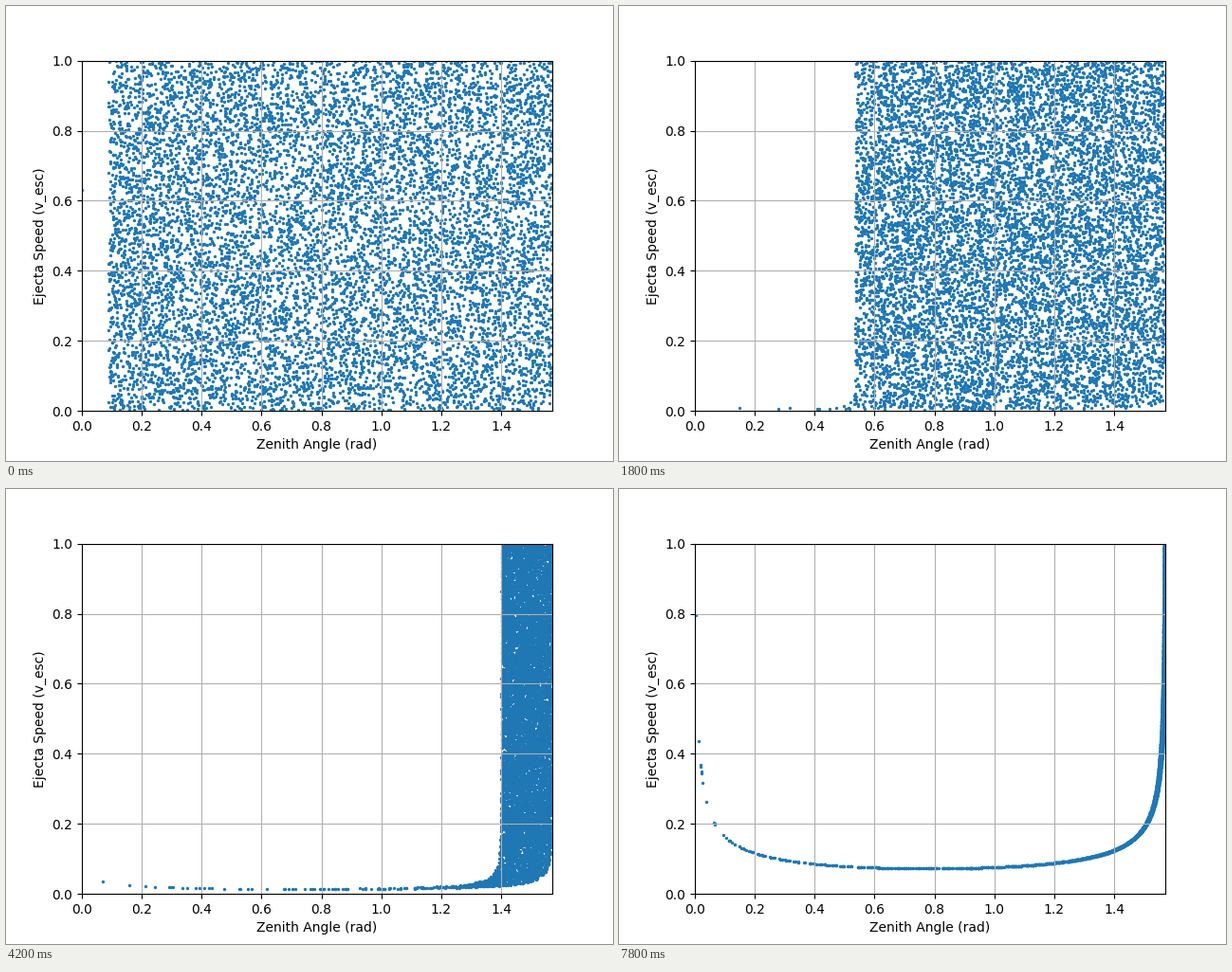
A matplotlib script that plays this animation: 640 by 480 pixels, repeating every 8 s.

```python
import numpy as np
import matplotlib.pyplot as plt
from matplotlib.animation import FuncAnimation

STEPS, HOLD, TICK_MS, LOOP_MS = 27, 3, 100, 8000
POINTS, BATCH = 10000, 400_000
# Lengths are in units of the body's diameter, speeds in escape speeds.
HEIGHT = 3.09e-5
RADIUS = 0.0254 * HEIGHT
FIRST_DISTANCE = 0.1145 * HEIGHT
GROWTH = 1.3247


def altitude(distance, zenith, speed):
    """Height above the curved ground after travelling a short distance."""
    drop = 1 - 0.5 / (speed * np.sin(zenith)) ** 2
    return distance / np.tan(zenith) + distance ** 2 * drop


def hits(distance, zenith, speed):
    """True where the path meets the front or the top of a cylinder."""
    near = altitude(distance - RADIUS, zenith, speed)
    far = altitude(distance + RADIUS, zenith, speed)
    return (near > 0) & ((near < HEIGHT) | (far < HEIGHT))


def sample(step):
    rng = np.random.default_rng(40 + step)
    distance = FIRST_DISTANCE * GROWTH ** step
    found, count = [], 0
    while count < POINTS:
        zenith = rng.uniform(1e-6, np.pi / 2, BATCH)
        speed = rng.uniform(1e-6, 1, BATCH)
        keep = hits(distance, zenith, speed)
        found.append(np.column_stack((zenith[keep], speed[keep])))
        count += len(found[-1])
    return np.concatenate(found)[:POINTS]


clouds = [sample(step) for step in range(STEPS)]

fig, ax = plt.subplots(figsize=(6.4, 4.8), dpi=100)
dots = ax.scatter(*clouds[0].T, s=2)
ax.set_xlim(0, np.pi / 2)
ax.set_ylim(0, 1)
ax.set_xlabel("Zenith Angle (rad)")
ax.set_ylabel("Ejecta Speed (v_esc)")
ax.grid(True)


def update(tick):
    dots.set_offsets(clouds[min(tick // HOLD, STEPS - 1)])
    return (dots,)


anim = FuncAnimation(fig, update, frames=LOOP_MS // TICK_MS, interval=TICK_MS,
                     repeat=True, repeat_delay=0, blit=False)
plt.show()
```
